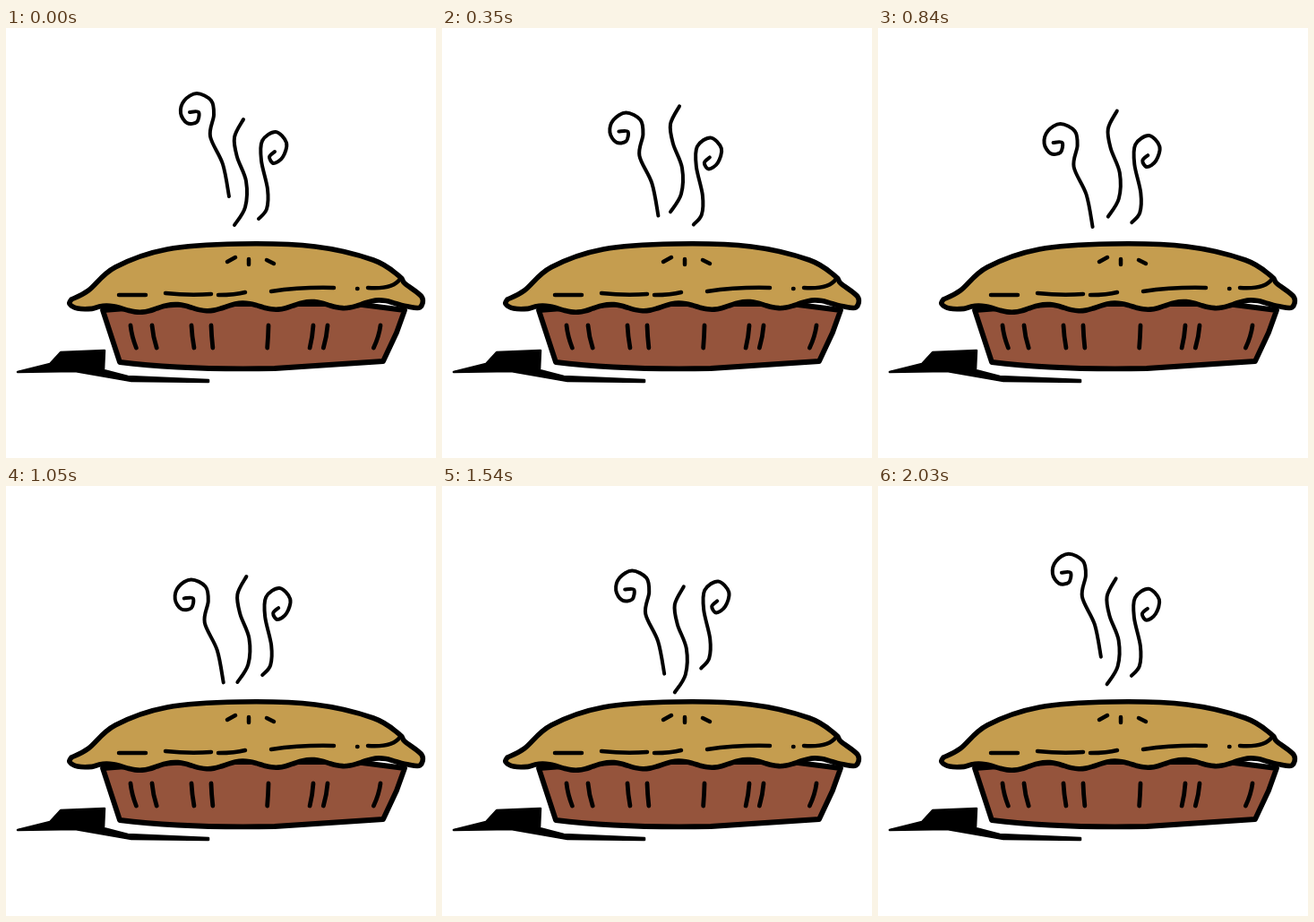
Animation of 480 by 480 pixels, one loop 2100 ms. Source, as an HTML page:

```html
<!DOCTYPE html>
<html lang="en">
<head>
<meta charset="utf-8">
<title>Steaming pie</title>
<style>
  html, body { margin: 0; width: 100%; height: 100%; overflow: hidden; background: #fff; }
  svg { display: block; width: 100vw; height: 100vh; }
  path { fill: none; stroke: #000; stroke-linecap: round; stroke-linejoin: round; }
</style>
</head>
<body>
<svg id="stage" viewBox="0 0 480 480"></svg>
<script>
const LOOP = 2100, STEP = 70;
const stage = document.getElementById('stage');

function path(d, width, fill) {
  const el = document.createElementNS('http://www.w3.org/2000/svg', 'path');
  el.setAttribute('d', d);
  el.style.strokeWidth = width;
  if (fill) el.style.fill = fill;
  return stage.appendChild(el);
}

const points = text => text.split(' ').map(s => s.split(',').map(Number));

// Smooth curve through all points
function smooth(p) {
  let d = 'M' + p[0];
  for (let i = 0; i < p.length - 1; i++) {
    const a = p[i - 1] || p[i], b = p[i], c = p[i + 1], e = p[i + 2] || c;
    const h1 = b.map((v, k) => v + (c[k] - a[k]) / 6);
    const h2 = c.map((v, k) => v - (e[k] - b[k]) / 6);
    d += `C${h1} ${h2} ${c}`;
  }
  return d;
}

// Shadow
path('M13 384L49 375 61 362 110 360 109 382 136 389 226 393V395L140 394 77 383Z', 2.5, '#000');

// Tin, with ribs that lean towards its middle
path('M108 315L127 373Q200 382 300 380L421 372 436 340 445 315 390 308H200Z', 5.8, '#95543c');
for (const x of [139, 163, 207, 229, 293, 343, 359, 418]) {
  const lean = (266 - x) / 20;
  path(`M${x} 332q${lean * .2} 12 ${lean} 25`, 4.8);
}

// Crust: domed top and a wavy hem
const rim = points('73,303 92,293 122,267 180,247 260,241 345,244 410,259 439,277 445,285 464,300 462,312');
for (let x = 448; x >= 96; x -= 8) {
  const s = x - 112;
  rim.push([x, 314 - s * .02 - 4 * Math.cos(s * 2 * Math.PI / 76)]);
}
rim.push([80, 313], [71, 308], [73, 303]);
path(smooth(rim) + 'Z', 5.6, '#c59d4f');
path('M126 298H156M178 296Q205 299 229 297M237 298Q256 298 267 295M296 294Q330 289 366 290' +
  'M392 291h.5M404 290Q432 292 440 280M247 261L256 256M271 258V264M291 259L299 263', 4.5);

// Steam: each wisp drifts between three places, given as [dx, dy]
const TURNS = [0, 600, 1400, LOOP];
const wisps = [
  {
    line: '205,94 215,94 213,105 202,106 195,95 199,81 213,73 229,81 232,97 228,121 242,152 249,188',
    stops: [[0, 0], [-13, 37], [-1, 27]], ease: 1
  },
  {
    line: '265,102 255,122 258,144 268,171 267,200 255,220',
    stops: [[0, 0], [0, -19], [6, 13]], ease: 1.7
  },
  {
    line: '300,138 294,144 299,151 309,144 313,128 301,116 286,126 285,148 292,180 291,202 282,213',
    stops: [[0, 0], [-2, 11], [9, -12]], ease: 1
  }
];
for (const w of wisps) w.el = path(smooth(points(w.line)), 4);

function place({ stops, ease }, t) {
  const i = TURNS.findLastIndex(turn => turn <= t);
  const from = stops[i], to = stops[(i + 1) % stops.length];
  const f = (t - TURNS[i]) / (TURNS[i + 1] - TURNS[i]);
  const k = i ? f : 1 - (1 - f) ** ease;
  return from.map((v, n) => v + (to[n] - v) * k);
}

const start = performance.now();
function draw(now) {
  const t = Math.floor(Math.max(0, now - start) % LOOP / STEP) * STEP;
  for (const w of wisps) w.el.setAttribute('transform', `translate(${place(w, t)})`);
  requestAnimationFrame(draw);
}
draw(start);
</script>
</body>
</html>
```
